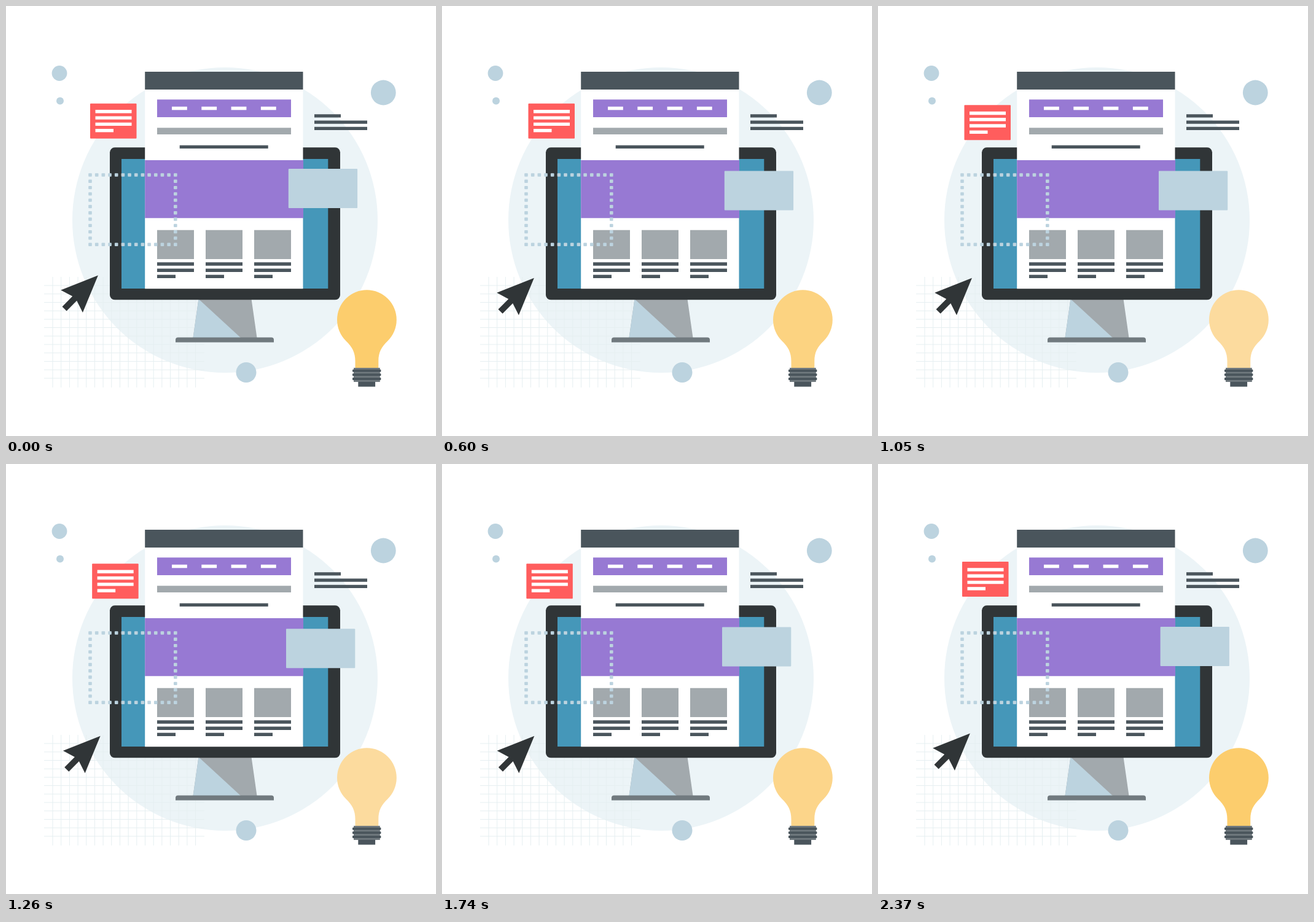
Recreate the animation shown at these times as an HTML page with a canvas. Size 700x700 px, loop 2.4 s.

```html
<!DOCTYPE html>
<html lang="en">
<head>
<meta charset="utf-8">
<title>Web design workspace</title>
<style>
html, body { margin: 0; width: 100%; height: 100%; overflow: hidden; background: #fff; }
canvas { display: block; width: 700px; height: 700px; }
</style>
</head>
<body>
<canvas id="stage" width="700" height="700"></canvas>
<script>
const ctx = document.getElementById('stage').getContext('2d');
const LOOP = 2400, STEP = 30;
const SLATE = '#4a555c', GREY = '#a2a9ad', MIST = '#bcd3df', PURPLE = '#9779d3', INK = '#303537', STEEL = '#717a7f';

function rect(color, x, y, w, h, radius = 0) {
  ctx.fillStyle = color;
  ctx.beginPath();
  ctx.roundRect(x, y, w, h, radius);
  ctx.fill();
}

function disc(color, x, y, r) {
  ctx.fillStyle = color;
  ctx.beginPath();
  ctx.arc(x, y, r, 0, Math.PI * 2);
  ctx.fill();
}

function polygon(color, points) {
  ctx.fillStyle = color;
  ctx.beginPath();
  points.forEach(([x, y]) => ctx.lineTo(x, y));
  ctx.closePath();
  ctx.fill();
}

// Moves at constant speed through four corners, one quarter of the loop per side.
function along(corners, p) {
  const side = Math.floor(p * 4), k = p * 4 - side;
  const a = corners[side], b = corners[(side + 1) % 4];
  return [a[0] + (b[0] - a[0]) * k, a[1] + (b[1] - a[1]) * k];
}

function drawBackdrop() {
  rect('#fff', 0, 0, 700, 700);
  disc('#ecf4f7', 356.5, 348.5, 248.5);
  for (let i = 0; i < 18; i++) rect('#e6eff1', 75.5 + i * 13.68, 441, 1, 180);
  for (let i = 0; i < 12; i++) rect('#e6eff1', 62, 454.5 + i * 13.72, 261, 1);
  disc(MIST, 87, 109.5, 12.4);
  disc(MIST, 88, 154.5, 6);
  disc(MIST, 614.3, 141, 20.4);
  disc(MIST, 391, 596.5, 16.5);
  rect(SLATE, 502, 176.3, 43, 5.3);
  rect(SLATE, 502, 186.5, 86, 5.3);
  rect(SLATE, 502, 196.7, 86, 5.3);
}

function drawMonitor() {
  polygon(GREY, [[313.5, 477], [399.5, 477], [408.5, 540], [304.5, 540]]);
  polygon(MIST, [[313.5, 477], [382, 540], [304.5, 540]]);
  rect(STEEL, 276, 539.5, 160, 8, [4, 4, 0, 0]);
  rect(INK, 169, 230.3, 375, 248, 8);
  rect('#4597b9', 188, 249, 336.3, 211);
}

function drawPage() {
  rect('#fff', 226.2, 107, 257.3, 353.3);
  rect(SLATE, 226.2, 107, 257.3, 29);
  rect(PURPLE, 246, 152.3, 218, 28.8);
  for (let i = 0; i < 4; i++) rect('#fff', 270 + i * 48.3, 163.8, 24.8, 5.5);
  rect(GREY, 246, 198.2, 218, 10.8);
  rect(SLATE, 282.7, 226.7, 144, 5.3);
  rect(PURPLE, 226.2, 251, 257.8, 94.3);
  for (let i = 0; i < 3; i++) {
    const x = 246 + i * 79;
    rect(GREY, x, 364.7, 60, 47.3);
    rect(SLATE, x, 417.2, 60, 5.5);
    rect(SLATE, x, 427.5, 60, 5.5);
    rect(SLATE, x, 437.6, 30, 5.4);
  }
}

function drawDottedFrame() {
  const left = 137, top = 275, w = 138.8, h = 113.2, cols = 13, rows = 11;
  const dot = (x, y) => rect(MIST, x - 2.8, y - 2.7, 5.6, 5.4, 1);
  for (let i = 0; i <= cols; i++) {
    dot(left + i * w / cols, top);
    dot(left + i * w / cols, top + h);
  }
  for (let i = 1; i < rows; i++) {
    dot(left, top + i * h / rows);
    dot(left + w, top + i * h / rows);
  }
}

function drawBulb(p) {
  const rise = 1 - Math.abs(1 - 2 * p);
  const glow = Math.min(1, Math.max(0, (rise - 0.4) / 0.25));
  ctx.fillStyle = `rgb(252 ${205 + 14 * glow} ${109 + 49 * glow})`;
  ctx.beginPath();
  ctx.arc(587.4, 510.7, 48.4, Math.PI * 0.75, Math.PI * 0.25);
  ctx.bezierCurveTo(611, 555, 606.3, 564, 606.3, 578);
  ctx.lineTo(606.3, 589.5);
  ctx.lineTo(568.5, 589.5);
  ctx.lineTo(568.5, 578);
  ctx.bezierCurveTo(568.5, 564, 563.8, 555, 553.2, 544.9);
  ctx.fill();
  rect(STEEL, 566, 589, 42.8, 23);
  for (let i = 0; i < 3; i++) rect(SLATE, 564, 591.7 + i * 6.6, 46.4, 4, 1);
  rect(SLATE, 573.3, 611.7, 27.8, 8);
}

function drawNote(p) {
  const [x, y] = along([[137, 158.7], [140.5, 158.7], [140.5, 162.2], [137, 162.2]], p);
  rect('#ff5d5d', x, y, 75.5, 57, 1);
  for (let i = 0; i < 4; i++) rect('#fff', x + 8.5, y + 10.4 + i * 10.3, i < 3 ? 59 : 29.5, 5.4);
}

function drawPanel(p) {
  const [x, y] = along([[459.8, 265.1], [459.8, 268.6], [456, 268.6], [456, 265.1]], p);
  rect(MIST, x, y, 112.3, 64, 1);
}

function drawPointer(p) {
  const [x, y] = along([[149.9, 438.4], [149.9, 442.8], [154, 442.8], [149.9, 442.8]], p);
  const shape = [[0, 0], [-25, 60.5], [-34.7, 41.3], [-51.3, 58], [-58.4, 51], [-41.7, 34.2], [-60.7, 24]];
  polygon(INK, shape.map(([dx, dy]) => [x + dx, y + dy]));
}

const start = performance.now();

function frame(now) {
  const time = Math.max(0, now - start) % LOOP;
  const p = Math.floor(time / STEP) * STEP / LOOP;
  drawBackdrop();
  drawMonitor();
  drawPage();
  drawDottedFrame();
  drawBulb(p);
  drawNote(p);
  drawPanel(p);
  drawPointer(p);
  requestAnimationFrame(frame);
}
frame(start);
</script>
</body>
</html>
```
